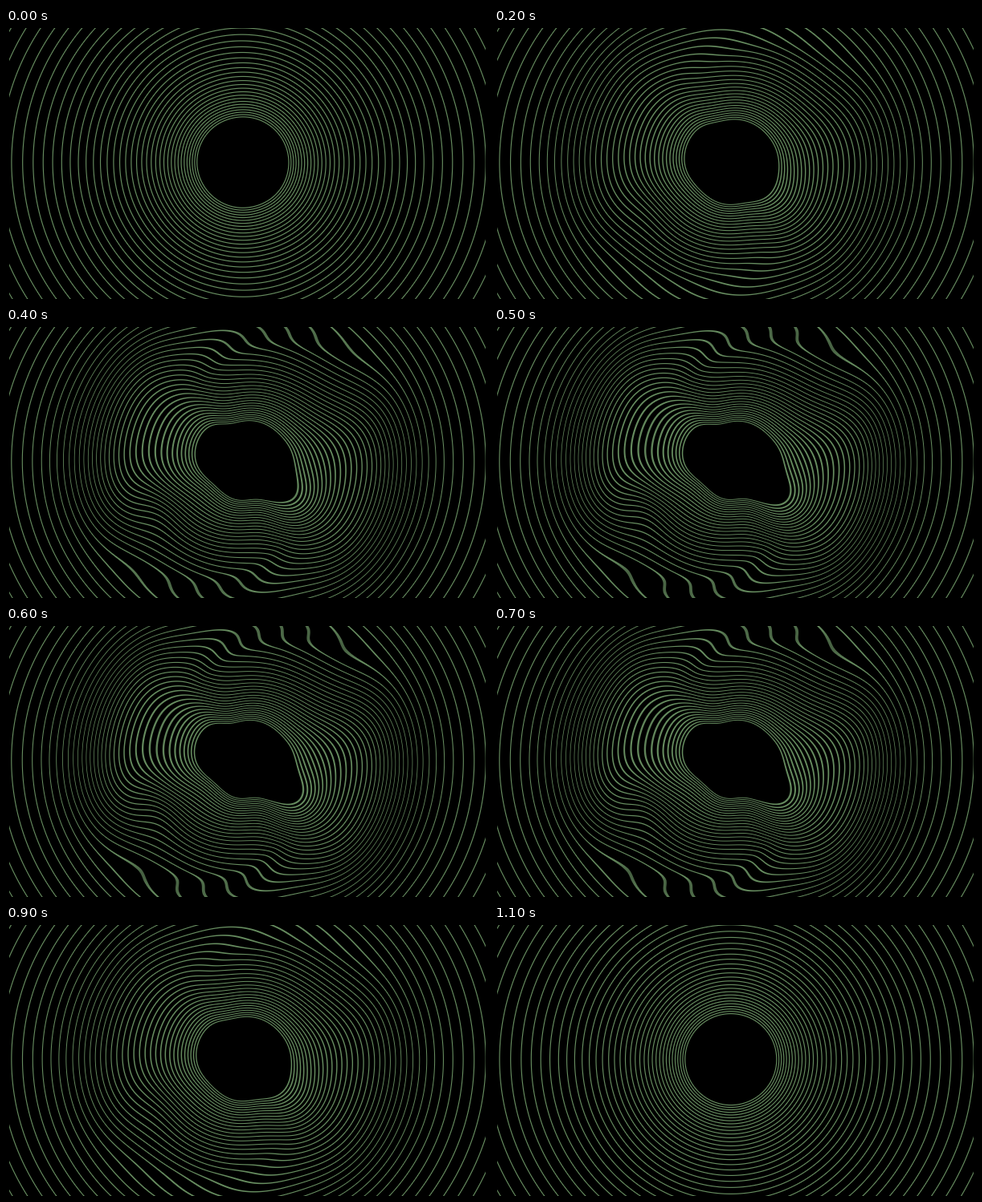
Recreate the animation shown at these times as an HTML page with a canvas. Size 600 by 338 pixels, loop 1.7 s.

```html
<!DOCTYPE html>
<html lang="en">
<head>
<meta charset="utf-8">
<title>Warped rings</title>
<style>
  html, body { margin: 0; width: 100%; height: 100%; overflow: hidden; background: #000; }
  canvas { display: block; }
</style>
</head>
<body>
<canvas id="stage" width="600" height="338"></canvas>
<script>
const W = 600, H = 338, CX = 294.8, CY = 167.6;
const LEFT = 4, RIGHT = 597;
const HOLE = 57, RATIO = 1.0503, LOG_RATIO = Math.log(RATIO);
const COLOR = [102, 140, 95];
const LOOP = 1700, STEP = 100;

const clamp = (v, lo, hi) => Math.min(hi, Math.max(lo, v));
const smooth = v => v * v * (3 - 2 * v);
const turn = deg => (deg + 900) % 360 - 180;

// Bell in radius that falls off differently towards and away from the centre
const bell = (d, inner, outer) => Math.exp(-((d / (d < 0 ? inner : outer)) ** 2) / 2);

// Four broad lobes a quarter turn apart: two swell outwards, two sink inwards along a spiral
function lobes(angle, radius) {
  let sum = 0;
  for (let i = 0; i < 4; i++) {
    const da = turn(angle - 15 - 90 * i);
    const span = Math.exp(-((da / 42) ** 4));
    sum += span * (i % 2
      ? -30 * bell(radius - 145 - .9 * da, 50, 20)
      : 42 * bell(radius - 160, 50, 38));
  }
  return sum;
}

// Smaller local features
function accent(angle, radius, at, dist, amount, spread, size) {
  const da = turn(angle - at);
  return amount * bell(da, spread, spread) * bell(radius - dist, size, size);
}

const push = (angle, radius) => lobes(angle, radius)
  + accent(angle, radius, 36, 90, 16, 20, 25)
  + accent(angle, radius, 138, 58, -13, 26, 28)
  + accent(angle, radius, 150, 122, -16, 14, 20);

const radii = new Float32Array(W * H);
const pushes = new Float32Array(W * H);
const warped = new Float32Array(W * H);
for (let y = 0, i = 0; y < H; y++) {
  for (let x = 0; x < W; x++, i++) {
    const dx = x + .5 - CX, dy = y + .5 - CY;
    radii[i] = Math.hypot(dx, dy);
    pushes[i] = push(Math.atan2(dy, dx) * 180 / Math.PI, radii[i]);
  }
}

const ctx = document.getElementById('stage').getContext('2d');
const image = ctx.createImageData(W, H);

// Light of the nearest ring: wider and softer where the warp stretches it
function ringLight(radius, slope) {
  if (radius < HOLE - 6) return 0;
  const k = Math.max(0, Math.round(Math.log(radius / HOLE) / LOG_RATIO));
  const gap = Math.abs(radius - HOLE * RATIO ** k) / slope;
  const half = Math.min(.58 / slope, 1.9);
  return clamp(half + .5 - gap, 0, Math.min(1, 2 * half)) * Math.min(1, .45 + slope);
}

function draw(strength) {
  for (let i = 0; i < warped.length; i++) warped[i] = radii[i] - strength * pushes[i];
  const data = image.data;
  for (let y = 0, i = 0; y < H; y++) {
    const up = y > 0 ? W : 0, down = y < H - 1 ? W : 0;
    for (let x = 0; x < W; x++, i++) {
      let light = 0;
      if (x >= LEFT && x < RIGHT) {
        const gx = (warped[i + 1] - warped[i - 1]) / 2;
        const gy = (warped[i + down] - warped[i - up]) * W / (up + down);
        light = ringLight(warped[i], Math.max(.12, Math.hypot(gx, gy)));
      }
      for (let c = 0; c < 3; c++) data[i * 4 + c] = COLOR[c] * light;
      data[i * 4 + 3] = 255;
    }
  }
  ctx.putImageData(image, 0, 0);
}

// Swells, peaks shortly after 500 ms, relaxes by 1100 ms and then rests
function strengthAt(time) {
  const rise = (time + 60) / 600, fall = (1100 - time) / 420;
  return smooth(clamp(Math.min(rise, fall), 0, 1));
}

const start = performance.now();
let shown = -1;
function tick() {
  const time = (performance.now() - start) % LOOP;
  const step = Math.floor(time / STEP) * STEP;
  if (step !== shown) {
    shown = step;
    draw(strengthAt(step));
  }
  requestAnimationFrame(tick);
}
tick();
</script>
</body>
</html>
```
